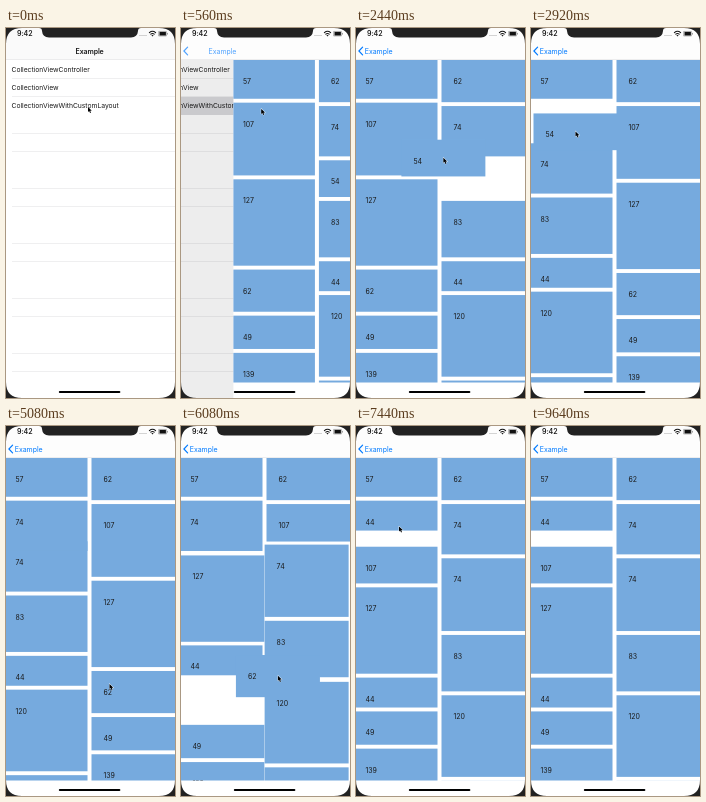
An HTML page with a canvas for the animation above (10 s loop, 169 by 370 pixels).

```html
<!DOCTYPE html>
<html lang="en">
<head>
<meta charset="utf-8">
<title>Reordering a collection view</title>
<style>
html, body { margin: 0; width: 169px; height: 370px; overflow: hidden; background: #fff; }
canvas { display: block; width: 169px; height: 370px; }
</style>
</head>
<body>
<canvas id="stage"></canvas>
<script>
const W = 169, H = 370, LOOP = 10000;
const TOP = 32, BOTTOM = 354.6, ROW = 18.33;
const SCALE = 0.68, GAP = 3.9, CELL_W = 84, COLS = [-2.5, 85.5];
const BLUE = '#76aade', TINT = '#007aff', BEZEL = '#222';

const stage = document.getElementById('stage');
const dpr = window.devicePixelRatio || 1;
stage.width = W * dpr;
stage.height = H * dpr;
const ctx = stage.getContext('2d');

// Cell sizes by id; the drawing order follows this list.
const values = { a: 57, b: 62, m: 90, l: 120, h: 83, d: 74, c: 107, f: 127, j: 44, i: 49, k: 139, e: 54, g: 62 };

// Stacks two columns of ids into cell frames.
function layout(left, right, sizes = {}) {
  const frames = {};
  [left, right].forEach((ids, col) => {
    let y = TOP;
    for (const id of ids) {
      const h = (sizes[id] || values[id]) * SCALE;
      frames[id] = { x: COLS[col], y, h };
      y += h + GAP;
    }
  });
  return frames;
}

const swapped = { e: 74, c: 54, d: 107 };
const layouts = [
  [0, layout('acfgik', 'bdehjlm')],
  [2480, layout('aedhjlm', 'bcfgik')],
  [5809, layout('aefjgik', 'bcdhlm', swapped)],
  [6150, layout('aegflm', 'bcdhjik', swapped)],
  [6456, layout('agcfjik', 'bedhlm', swapped)]
];
const SHIFT = 300, DROP = 240;

// After a drop the cell takes over another item's number and size.
const drags = {
  e: { from: 2160, to: 3440, becomes: 74 },
  g: { from: 5800, to: 7200, becomes: 44 }
};

// Pointer path: time, x, y
const pointer = [
  [0, 82, 79], [39, 82, 79], [40, 80.5, 79.5], [200, 80.5, 79.5], [840, 80, 82],
  [1200, 113, 136], [1520, 113, 143], [2160, 113, 143], [2500, 82, 127],
  [2920, 44.5, 103.5], [3160, 43.7, 101], [3240, 43.5, 99], [4440, 43.5, 99],
  [4760, 78, 188], [5080, 103.5, 258], [5440, 104.5, 258], [5800, 104.5, 258],
  [6080, 97, 250], [6300, 80, 205], [6500, 56, 132], [6680, 44, 100.4],
  [6800, 43, 100.4], [9080, 43, 100.4], [9280, 62, 136], [9520, 62, 136], [9620, 18, 99]
];

const mix = (a, b, p) => a + (b - a) * p;
const span = (t, start, length) => Math.min(1, Math.max(0, (t - start) / length));
const ease = p => 0.5 - 0.5 * Math.cos(Math.PI * p);
const blend = (a, b, p) => ({ x: mix(a.x, b.x, p), y: mix(a.y, b.y, p), h: mix(a.h, b.h, p) });

function pointerAt(t) {
  const n = pointer.findIndex(k => k[0] > t);
  if (n < 0) return pointer[pointer.length - 1].slice(1);
  const a = pointer[n - 1], b = pointer[n], p = span(t, a[0], b[0] - a[0]);
  return [mix(a[1], b[1], p), mix(a[2], b[2], p)];
}

function slotAt(id, t) {
  let n = layouts.length - 1;
  while (layouts[n][0] > t) n--;
  const now = layouts[n][1][id];
  return n ? blend(layouts[n - 1][1][id], now, ease(span(t, layouts[n][0], SHIFT))) : now;
}

function cellAt(id, t) {
  const slot = slotAt(id, t), drag = drags[id];
  if (!drag || t < drag.from) return slot;
  const [px, py] = pointerAt(Math.min(t, drag.to));
  const h = values[id] * SCALE;
  const held = { x: px - CELL_W / 2, y: py - h / 2 + 0.3, h };
  if (t < drag.to) return blend(slot, held, ease(span(t, drag.from, 120)));
  return blend(held, { ...slot, h: drag.becomes * SCALE }, ease(span(t, drag.to, DROP)));
}

function rect(x, y, w, h, color) {
  ctx.fillStyle = color;
  ctx.fillRect(x, y, w, h);
}

function text(str, x, y, { size = 7, weight = 400, color = '#1a1a1a', spacing = -0.05, align = 'left' } = {}) {
  ctx.font = `${weight} ${size}px Inter, Roboto, sans-serif`;
  ctx.letterSpacing = spacing + 'px';
  ctx.textAlign = align;
  ctx.fillStyle = color;
  ctx.fillText(str, x, y);
}

function shape(d, color) {
  ctx.fillStyle = color;
  ctx.fill(new Path2D(d), 'evenodd');
}

function line(d, color, width) {
  ctx.strokeStyle = color;
  ctx.lineWidth = width;
  ctx.lineCap = 'round';
  ctx.stroke(new Path2D(d));
}

function drawList(t, push) {
  ctx.save();
  ctx.translate(-0.3 * W * push, 0);
  rect(0, TOP, W, H, '#fff');
  if (t >= 200) rect(0, TOP + 2 * ROW, W, ROW, '#d9d9dc');
  for (let n = 1; n < 18; n++) {
    if (n % 3) rect(6, Math.floor(TOP + n * ROW), W, 1, '#efeff0');
  }
  ['CollectionViewController', 'CollectionView', 'CollectionViewWithCustomLayout'].forEach((name, n) =>
    text(name, 5.5, TOP + (n + 0.5) * ROW + 2.4, { size: 6.8, spacing: -0.04 }));
  ctx.restore();
  rect(0, TOP, W, H, `rgba(0,0,0,${0.1 * push})`);
}

function drawCells(t, push) {
  ctx.save();
  ctx.translate(W * (1 - push), 0);
  rect(0, TOP, W, H, '#fff');
  ctx.beginPath();
  ctx.rect(0, TOP, W, BOTTOM - TOP);
  ctx.clip();
  for (const id in values) {
    const { x, y, h } = cellAt(id, t), drag = drags[id];
    rect(x, y, CELL_W, h, BLUE);
    text(drag && t >= drag.to ? drag.becomes : values[id], x + 12, y + 24);
  }
  ctx.restore();
}

function drawBar(push) {
  rect(0, 0, W, TOP, push > 0 ? '#fdfdfd' : '#fafafa');
  rect(0, TOP - 0.5, W, 0.5, '#dcdcde');
  const shift = -60.5 * push;
  ctx.globalAlpha = Math.max(0, 1 - push * 1.5);
  text('Example', 83.6 + shift, 25.6, { weight: 600, align: 'center', spacing: -0.12 });
  ctx.globalAlpha = push;
  text('Example', 69.3 + shift, 25.6, { color: TINT });
  line('M6.6 19.2 L2.9 23 L6.6 26.8', TINT, 1.2);
  ctx.globalAlpha = 1;
}

function drawPhone() {
  text('9:42', 11, 8.4, { weight: 600 });
  for (let n = 0; n < 4; n++) rect(133.5 + n * 2, 7, 1, 1, '#aaa');
  line('M143.4 4.6 Q146.5 2 149.6 4.6 M144.8 6.2 Q146.5 4.8 148.2 6.2', '#111', 1.1);
  shape('M145.4 7.3 Q146.5 6.5 147.6 7.3 L146.5 8.6Z', '#111');
  line('M153 3.4 H160.4 V8 H153Z', '#777', 0.5);
  rect(153.5, 3.9, 6.4, 3.6, '#111');
  rect(161, 4.9, 0.7, 1.7, '#777');
  shape('M33 0 Q36 0 36 3 Q36.5 9.4 43 9.4 H125 Q131.5 9.4 132 3 Q132 0 135 0Z', BEZEL);
  shape('M0 0H169V370H0Z M16 0H153Q169 0 169 16V354Q169 370 153 370H16Q0 370 0 354V16Q0 0 16 0Z', BEZEL);
  line('M53.8 364 H113.4', '#000', 2);
}

function drawPointer(t) {
  if (t >= 9620) return;
  const [x, y] = pointerAt(t);
  ctx.save();
  ctx.translate(x, y);
  ctx.scale(0.9, 0.9);
  const arrow = 'M0 0 L0 5.6 L1.3 4.5 L2.3 6.8 L3.3 6.3 L2.4 4.2 L4.2 4.1Z';
  line(arrow, 'rgba(255,255,255,.8)', 0.8);
  shape(arrow, '#000');
  ctx.restore();
}

function draw(now) {
  const t = now % LOOP;
  // Critically damped spring for the screen push.
  const s = Math.max(0, t - 430) * 0.01826;
  const push = t > 1200 ? 1 : 1 - (1 + s) * Math.exp(-s);
  ctx.setTransform(dpr, 0, 0, dpr, 0, 0);
  rect(0, 0, W, H, '#fff');
  if (push < 1) drawList(t, push);
  if (push > 0) drawCells(t, push);
  drawBar(push);
  drawPhone();
  drawPointer(t);
}

const start = performance.now();
function tick() {
  draw(performance.now() - start);
  requestAnimationFrame(tick);
}
tick();
</script>
</body>
</html>
```
